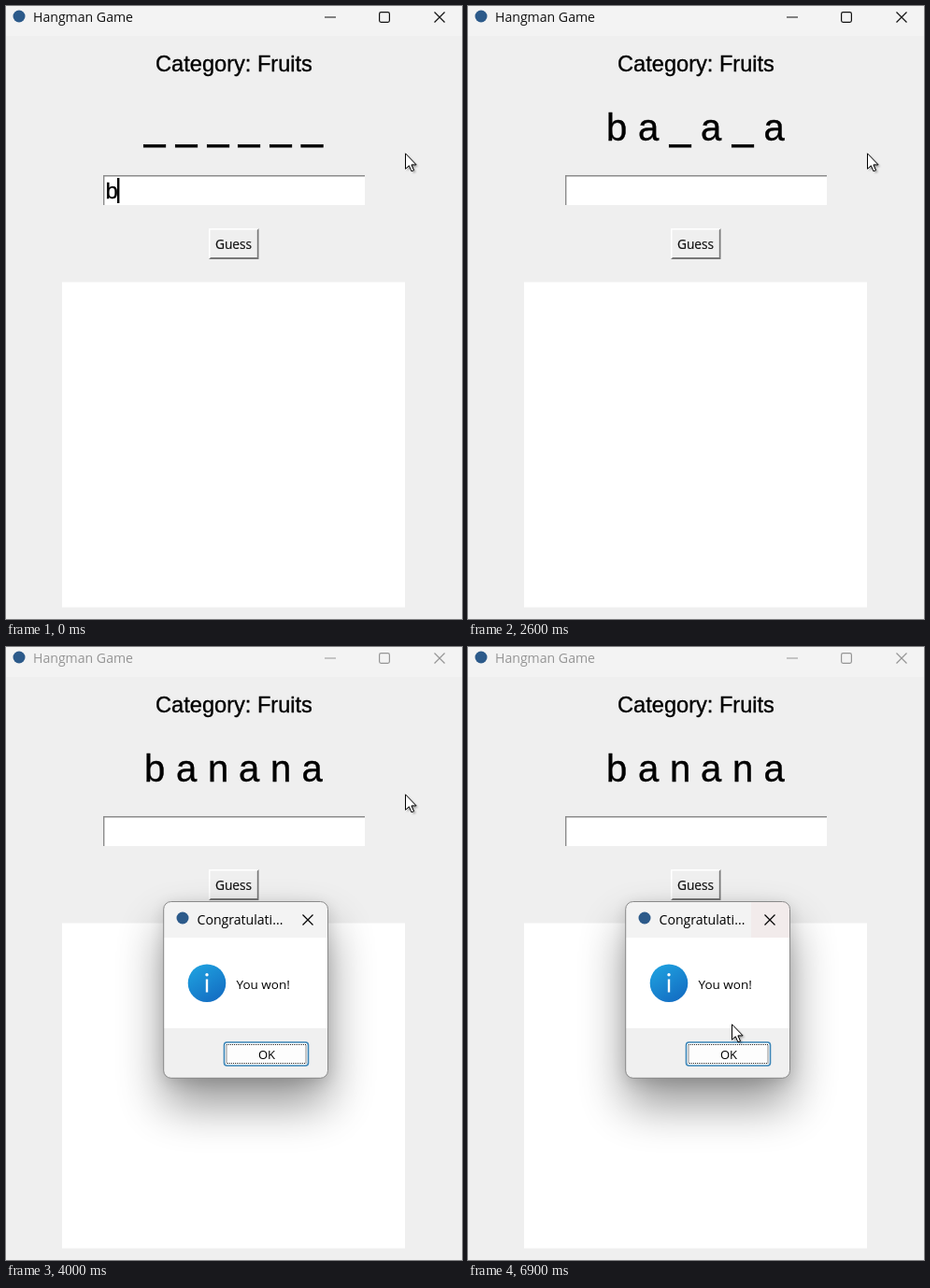
Animation, 488 px wide and 656 px high, one loop 7 s. Source, as an HTML page:

```html
<!DOCTYPE html>
<html lang="en">
<head>
<meta charset="utf-8">
<title>Hangman Game</title>
<style>
  html, body { margin: 0; width: 100%; height: 100%; overflow: hidden; background: #efefef; }
  svg { display: block; }
  .ui { font-family: "Open Sans", "Noto Sans", sans-serif; font-size: 14.1px; }
  .tk { font-family: "Liberation Sans", Arial, sans-serif; stroke: #000; stroke-width: .35; white-space: pre; }
  .mid { text-anchor: middle; }
  .line { fill: none; stroke: currentColor; stroke-width: 1.2; }
</style>
</head>
<body>
<svg width="488" height="656" viewBox="0 0 488 656">
  <defs>
    <linearGradient id="blue" x2=".6" y2="1">
      <stop stop-color="#20a6e2"/><stop offset="1" stop-color="#1470c4"/>
    </linearGradient>
    <filter id="wide" x="-1" y="-1" width="3" height="3"><feGaussianBlur stdDeviation="25"/></filter>
    <filter id="near" x="-1" y="-1" width="3" height="3"><feGaussianBlur stdDeviation="8"/></filter>
    <filter id="soft" x="-1" y="-1" width="3" height="3"><feGaussianBlur stdDeviation="1"/></filter>
    <clipPath id="frame"><rect x="169" y="272.5" width="175.5" height="188.5" rx="8"/></clipPath>
    <path id="arrow" d="M0 0V16.5L3.8 13 6.4 19 9 17.9 6.4 12.1H11.6Z"/>
  </defs>

  <rect width="488" height="656" fill="#efefef"/>
  <rect width="488" height="32" fill="#f3f3f3"/>
  <circle cx="14" cy="11" r="6.5" fill="#2c5a8a"/>
  <g id="bar" class="ui">
    <text x="29" y="17" fill="currentColor">Hangman Game</text>
    <path class="line" d="M341 12H353M458.5 6.5L469.5 17.5M469.5 6.5L458.5 17.5"/>
    <rect class="line" x="399.6" y="6.6" width="10.8" height="10.8" rx="1.8"/>
  </g>

  <text class="tk mid" x="244" y="70" font-size="23.6">Category: Fruits</text>
  <text id="letters" class="tk mid" x="159 193 227 260 294 327.5" y="144" font-size="40"></text>
  <text id="blanks" class="tk mid" x="159 193 227 260 294 327.5" y="142.5" font-size="40" style="stroke-width:.9"></text>

  <rect x="104" y="181" width="280" height="32" fill="#fff"/>
  <path d="M104.7 213V181.7H384" fill="none" stroke="#8c8c8c" stroke-width="1.4"/>
  <text id="typed" class="tk" x="106.5" y="206" font-size="24"></text>
  <rect id="caret" y="184" width="2.4" height="27"/>

  <rect x="217" y="238" width="53.5" height="33" fill="#fff"/>
  <path d="M270.5 238V271H217L219 269H268.5V240Z" fill="#777"/>
  <rect x="218.5" y="239.5" width="50" height="29.5" fill="#efefef"/>
  <text class="ui mid" x="243.5" y="260" fill="#111" stroke="#111" stroke-width=".2" style="font-size:13.7px">Guess</text>

  <rect x="60" y="295.5" width="367" height="348" fill="#fff"/>

  <g id="dialog">
    <rect x="169" y="300" width="176" height="189" rx="8" opacity=".42" filter="url(#wide)"/>
    <rect x="169" y="276" width="176" height="189" rx="8" opacity=".13" filter="url(#near)"/>
    <g clip-path="url(#frame)">
      <rect x="169" y="272" width="176" height="189" fill="#fff"/>
      <rect x="169" y="272" width="176" height="39" fill="#f3f3f3"/>
      <rect id="hover" x="303" y="272" width="42" height="39" fill="#c42b1c"/>
      <rect x="169" y="408" width="176" height="53" fill="#f0f0f0"/>
    </g>
    <rect x="168.7" y="272.5" width="175.8" height="188.8" rx="8" fill="none" stroke="#8a8a8a"/>
    <circle cx="189" cy="290" r="6.5" fill="#2c5a8a"/>
    <path class="line" d="M317.5 286.5L328.5 297.5M328.5 286.5L317.5 297.5"/>
    <circle cx="215" cy="359.7" r="20.3" fill="url(#blue)"/>
    <circle cx="215" cy="350.8" r="1.7" fill="#fff"/>
    <path d="M215 355.5V369.5" stroke="#fff" stroke-width="2.4"/>
    <rect x="233.5" y="423" width="90" height="25" rx="3" fill="#fdfdfd" stroke="#3c86b8" stroke-width="1.6"/>
    <rect x="236" y="425.5" width="85" height="20" fill="none" stroke="#222" stroke-dasharray="1 1"/>
    <g class="ui">
      <text x="204.5" y="297">Congratulati...</text>
      <text x="246.5" y="366" style="font-size:13.5px">You won!</text>
      <text class="mid" x="279" y="441" style="font-size:13px">OK</text>
    </g>
  </g>

  <g id="mouse">
    <use href="#arrow" x="2" y="2" opacity=".35" filter="url(#soft)"/>
    <use href="#arrow" fill="#fff" stroke="#000" stroke-linejoin="round"/>
  </g>
</svg>
<script>
const LOOP = 7000, WON = 3700;
const part = id => document.getElementById(id);
const [bar, letters, blanks, typed, caret, dialog, hover, mouse] =
  ["bar", "letters", "blanks", "typed", "caret", "dialog", "hover", "mouse"].map(part);

// Each step: [start, value], held until the next one
const words = [[0, "______"], [500, "b_____"], [1700, "ba_a_a"], [WON, "banana"]];
const entries = [[0, "b"], [500, ""], [1200, "a"], [1700, ""], [3000, "n"], [WON, ""]];
// Keys: [time, ...values], blended linearly
const route = [[6200, 427.5, 157.8], [6400, 464, 205], [6550, 400, 255],
               [6680, 324, 292], [6800, 296, 426], [6900, 282.5, 403.8]];
const glow = [[6600, 0], [6700, .3], [6800, .12], [6900, .04]];

const held = (steps, t) => steps.findLast(([start]) => start <= t)[1];

function blend(keys, t) {
  const next = keys.findIndex(([time]) => time > t);
  if (next < 1) return keys.at(next).slice(1);
  const [a, b] = [keys[next - 1], keys[next]];
  const k = (t - a[0]) / (b[0] - a[0]);
  return a.slice(1).map((v, i) => v + (b[i + 1] - v) * k);
}

function show(node, text) {
  if (node.textContent !== text) node.textContent = text;
}

function draw() {
  const t = performance.now() % LOOP;
  const won = t >= WON, word = held(words, t), entry = held(entries, t);
  show(letters, word.replace(/_/g, " "));
  show(blanks, word.replace(/[a-z]/g, " "));
  show(typed, entry);
  caret.setAttribute("x", entry ? 119 : 105.3);
  caret.setAttribute("opacity", !won && t % 900 < 600 ? 1 : 0);
  bar.style.color = won ? "#959595" : "#111";
  dialog.setAttribute("opacity", Math.min(1, Math.max(0, (t - WON + 60) / 200)) * won);
  hover.setAttribute("opacity", blend(glow, t)[0]);
  mouse.setAttribute("transform", `translate(${blend(route, t)})`);
  requestAnimationFrame(draw);
}
draw();
</script>
</body>
</html>
```
